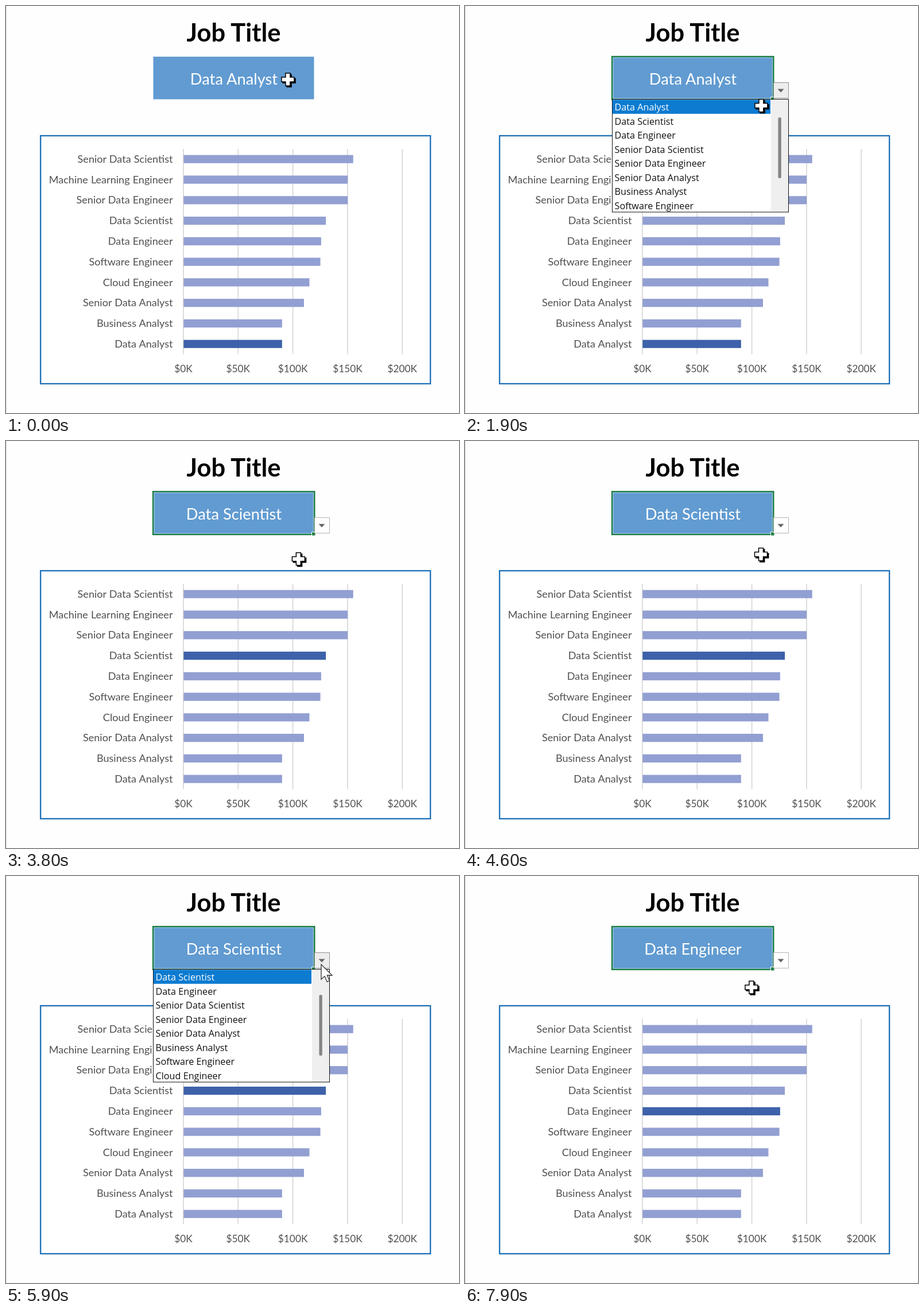
An HTML page for the animation above (8000 ms loop, 789 by 709 pixels).

```html
<!DOCTYPE html>
<html lang="en">
<head>
<meta charset="utf-8">
<title>Job Title</title>
<style>
  html, body { margin: 0; width: 100%; height: 100%; overflow: hidden; background: #fefefe; }
  svg { display: block; }
  text { font-family: Lato, "Open Sans", sans-serif; }
  #chart text { font-size: 18.1px; word-spacing: .4px; fill: #505050; }
  #chart .axis { font-size: 17.3px; }
  #list text { font: 16.2px "Open Sans", "Noto Sans", sans-serif; fill: #111; }
</style>
</head>
<body>
<svg width="789" height="709" viewBox="0 0 789 709">
  <rect width="1" height="709" fill="#d9d9d9"/>
  <text x="396.5" y="62" font-size="43.5" font-weight="700" text-anchor="middle">Job Title</text>

  <rect x="256.5" y="88.5" width="280" height="74" fill="#619bd1"/>
  <path d="M256.5 89H536.5" stroke="#4a84bd" stroke-dasharray="1 1"/>
  <text id="value" x="397" y="136.7" font-size="27.3" text-anchor="middle" fill="#fff"></text>

  <g id="chart">
    <rect x="60.2" y="226" width="679" height="432" fill="#fff" stroke="#1c70b8" stroke-width="2.3"/>
  </g>

  <g id="selection">
    <rect x="256.2" y="88.2" width="281" height="74.6" fill="none" stroke="#1f7f46" stroke-width="2.6"/>
    <rect x="258" y="90" width="277.4" height="71" fill="none" stroke="#e4eff8" stroke-dasharray="1 .6"/>
    <rect x="532.5" y="158.5" width="6.5" height="6.5" fill="#1f7f46" stroke="#fff"/>
    <rect id="button" x="537.5" y="133.5" width="26" height="27"/>
    <path d="M544.5 144.5h11l-5.5 6z" fill="#666"/>
  </g>

  <g id="list">
    <rect x="256.5" y="162.5" width="307" height="196.5" fill="#fff"/>
    <rect x="533" y="163" width="30" height="195.5" fill="#efefef"/>
    <rect id="hover" x="257" width="275" height="24.5" fill="#0c7bd0"/>
    <g id="items"></g>
    <rect id="thumb" x="545.4" width="5.4" height="106" rx="2.5" fill="#858585"/>
    <rect x="256.5" y="162.5" width="307" height="196.5" fill="none" stroke="#111"/>
  </g>

  <g id="plus">
    <path d="M-4-11H4V-4H11V4H4V11H-4V4H-11V-4H-4z" transform="translate(1.6 1.6)" stroke="#000" stroke-width="1.4"/>
    <path d="M-4-11H4V-4H11V4H4V11H-4V4H-11V-4H-4z" transform="translate(-.6 -.6)" fill="#fff" stroke="#000" stroke-width="1.5"/>
  </g>
  <path id="arrow" d="M0 0V26L6 20.5L10.3 30.3L14.5 28.5L10.4 19H19z" fill="#fff" stroke="#333" stroke-width="1.3"/>
</svg>
<script>
const $ = id => document.getElementById(id);
const ROW = 24.5;

// Salaries in thousands of dollars
const jobs = [
  ['Senior Data Scientist', 155], ['Machine Learning Engineer', 150],
  ['Senior Data Engineer', 150], ['Data Scientist', 130],
  ['Data Engineer', 125.7], ['Software Engineer', 125],
  ['Cloud Engineer', 115], ['Senior Data Analyst', 110],
  ['Business Analyst', 90], ['Data Analyst', 90]
];
const options = ['Data Analyst', 'Data Scientist', 'Data Engineer', 'Senior Data Scientist',
  'Senior Data Engineer', 'Senior Data Analyst', 'Business Analyst', 'Software Engineer',
  'Cloud Engineer', 'Machine Learning Engineer'];

// Pointer path: time, x, y
const path = [
  [0, 491.5, 128.5], [200, 491.5, 128.5], [700, 510, 134], [900, 510, 134],
  [1200, 548, 149], [1500, 548, 150], [1900, 516.5, 174], [2300, 516, 176],
  [2900, 510, 206], [4400, 510, 206], [5200, 549, 156], [5400, 550.5, 158],
  [5700, 550, 154], [5900, 549, 154], [6300, 499.5, 194.5], [8000, 499.5, 194.5]
];

let chart = '';
for (let k = 0; k <= 200; k += 50) {
  const x = 309 + k * 1.906;
  chart += `<path d="M${x} 249V606.5" stroke="#d9d9d9" stroke-width="1.8"/>
    <text class="axis" x="${x}" y="638" text-anchor="middle">$${k}K</text>`;
}
jobs.forEach(([name, pay], i) => {
  const y = 266.7 + i * 35.78;
  chart += `<text x="290.5" y="${y + 6.2}" text-anchor="end">${name}</text>
    <rect class="bar" x="309.3" y="${y - 7.1}" width="${pay * 1.906}" height="14.2"/>`;
});
$('chart').innerHTML += chart;
const bars = document.querySelectorAll('.bar');

const within = (t, a, b) => t >= a && t < b;
const show = (id, on) => $(id).setAttribute('display', on ? 'inline' : 'none');
const place = (id, x, y) => $(id).setAttribute('transform', `translate(${x} ${y})`);

function pointer(t) {
  const i = path.findIndex(p => p[0] > t);
  const [t0, x0, y0] = path[i - 1], [t1, x1, y1] = path[i];
  const u = (t - t0) / (t1 - t0), e = u * u * (3 - 2 * u);
  return [x0 + (x1 - x0) * e, y0 + (y1 - y0) * e];
}

function drawList(first, y) {
  const hover = Math.max(0, Math.min(7, Math.floor((y - 163.5) / ROW)));
  $('hover').setAttribute('y', 163.3 + hover * ROW);
  $('thumb').setAttribute('y', 194 + first * 13);
  $('items').innerHTML = options.slice(first, first + 8).map((name, i) =>
    `<text x="260.5" y="${182 + i * ROW}"${i === hover ? ' style="fill:#fff"' : ''}>${name}</text>`).join('');
}

function draw(t) {
  const [x, y] = pointer(t);
  const choice = t < 3800 ? 0 : t < 6700 ? 1 : 2;
  const open = within(t, 1500, 3700) || within(t, 5900, 6600);
  const onButton = !open && t >= 400 && x > 537 && x < 564 && y > 133 && y < 161;
  const active = open || onButton || within(t, 6600, 6700);

  $('value').textContent = options[choice];
  bars.forEach((bar, i) =>
    bar.setAttribute('fill', jobs[i][0] === options[choice] ? '#3d62aa' : '#929fd2'));
  show('selection', t >= 400);
  $('button').setAttribute('fill', active ? '#ededed' : '#fff');
  $('button').setAttribute('stroke', active ? '#909090' : '#b4b4b4');
  show('list', open);
  if (open) drawList(choice, y);

  const arrow = onButton || (open && x > 533);
  show('arrow', arrow);
  show('plus', !arrow);
  place(arrow ? 'arrow' : 'plus', x, y);
}

let start;
function frame(now) {
  start ??= now;
  draw(Math.floor((now - start) % 8000 / 100) * 100);
  requestAnimationFrame(frame);
}
draw(0);
requestAnimationFrame(frame);
</script>
</body>
</html>
```
